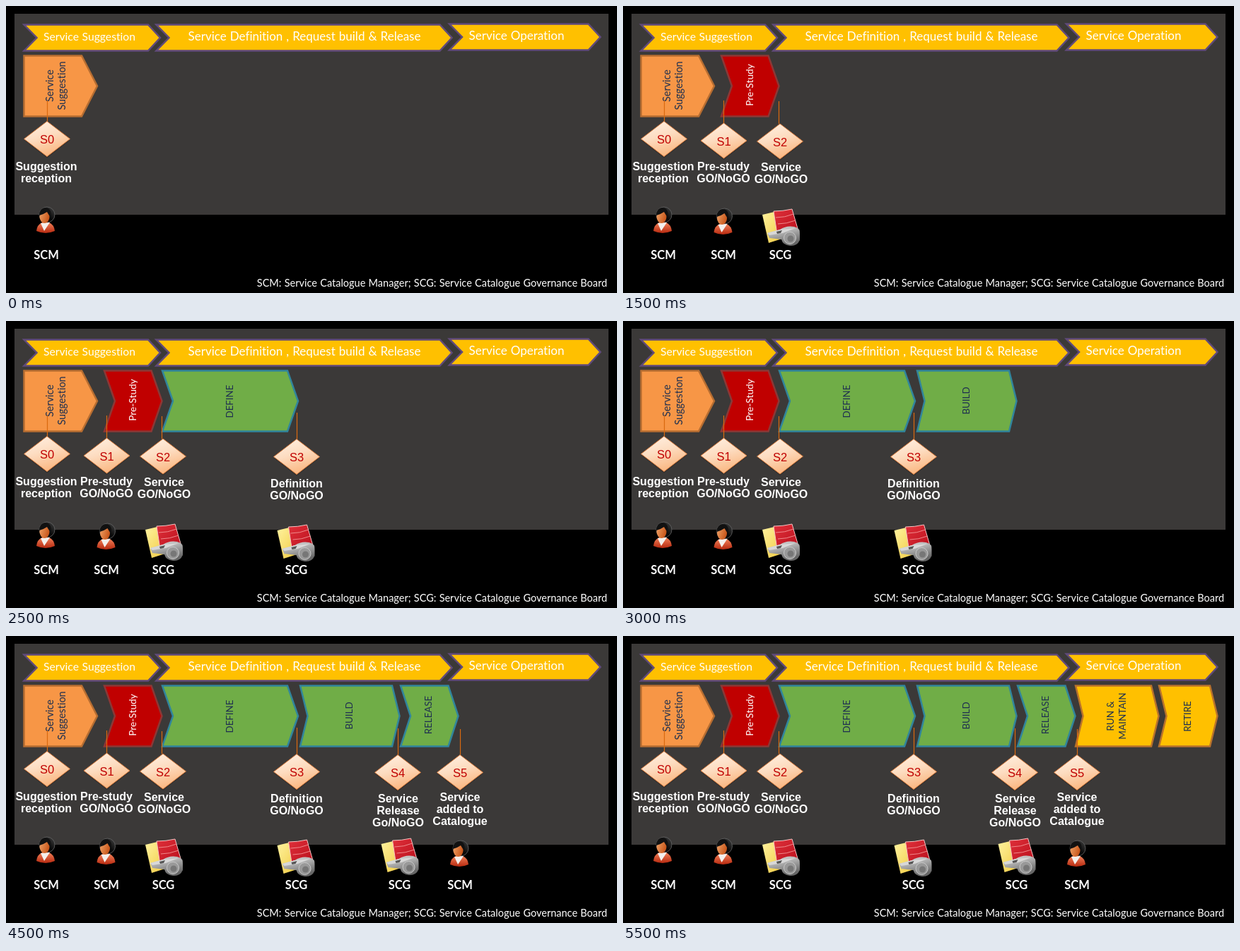
Write an HTML page that moves like this. It is 864 px wide and 407 px high and loops after 7000 ms.

```html
<!DOCTYPE html>
<html lang="en">
<head>
<meta charset="utf-8">
<title>Service life cycle</title>
<style>
html, body { margin: 0; width: 100%; height: 100%; overflow: hidden; background: #000; }
svg { display: block; width: 864px; height: 407px; }
text { font-family: Lato, Carlito, sans-serif; font-variant-ligatures: none; word-spacing: .04em; text-anchor: middle; fill: #fff; }
.label, .code { font: bold 16px "Liberation Sans", Arial, sans-serif; word-spacing: 0; }
.code { font-weight: normal; font-size: 16.5px; fill: #c00000; }
.role { font-size: 16.5px; font-weight: bold; }
</style>
</head>
<body>
<svg id="stage" viewBox="0 0 864 407">
  <defs>
    <linearGradient id="peach" x1=".2" y1="0" x2=".6" y2="1">
      <stop offset="0" stop-color="#fff0e2"/><stop offset=".45" stop-color="#fddcc0"/><stop offset="1" stop-color="#fab47c"/>
    </linearGradient>
    <linearGradient id="skin" x2="1" y2=".4">
      <stop offset="0" stop-color="#f0a468"/><stop offset="1" stop-color="#c9581c"/>
    </linearGradient>
    <linearGradient id="coat" x2="0" y2="1">
      <stop offset="0" stop-color="#f08058"/><stop offset="1" stop-color="#b82a10"/>
    </linearGradient>
    <linearGradient id="hair" x1="0" y1="1" x2="1" y2="0">
      <stop offset=".5" stop-color="#0a0a0a"/><stop offset="1" stop-color="#444"/>
    </linearGradient>
    <linearGradient id="yellow" x2="1" y2="1">
      <stop offset="0" stop-color="#fff3a0"/><stop offset="1" stop-color="#f0c83c"/>
    </linearGradient>
    <linearGradient id="red" x2="1" y2="1">
      <stop offset="0" stop-color="#e0303a"/><stop offset="1" stop-color="#b80f1c"/>
    </linearGradient>
    <linearGradient id="silver" x2=".4" y2="1">
      <stop offset="0" stop-color="#e4e4e4"/><stop offset=".5" stop-color="#a8a8a8"/><stop offset="1" stop-color="#666"/>
    </linearGradient>
    <g id="SCM">
      <circle cx="15" cy="12" r="11" fill="url(#hair)" stroke="#666" stroke-width=".8"/>
      <path d="M0 35Q1 26 8 23H18Q25 26 26 35Q13 41 0 35Z" fill="url(#coat)"/>
      <path d="M6 24L11 35L19 23Z" fill="#f4f0ec"/>
      <ellipse cx="11.5" cy="15" rx="7" ry="9" fill="url(#skin)"/>
      <path d="M4 13Q4 3 13 2Q22 3 20 15Q17 12 15 8Q11 11 4 13Z" fill="#111"/>
    </g>
    <g id="SCG">
      <path d="M1 9L22 4L32 42L10 49Z" fill="url(#yellow)"/>
      <path d="M17 4Q30 4 43 1L52 32Q36 38 22 37Z" fill="url(#red)" stroke="#f6c4c4"/>
      <path d="M20 13Q33 13 45 8M23 22Q35 22 48 17" fill="none" stroke="#f08a8c"/>
      <path d="M8 35L26 30Q35 24 46 26Q55 28 54 36L54 45Q50 54 40 53Q30 52 28 44L11 42Z" fill="url(#silver)"/>
      <path d="M8 35L26 30L48 28L30 35L11 38Z" fill="#d8d8d8"/>
      <circle cx="40" cy="42" r="8.5" fill="#999" stroke="#c8c8c8"/>
      <circle cx="41" cy="43" r="4.5" fill="#777"/>
      <path d="M21 33L29 31L27 35L22 36Z" fill="#555"/>
    </g>
  </defs>
  <rect width="864" height="407"/>
  <rect x="12" y="11" width="840" height="285" fill="#3b3938"/>
</svg>
<script>
const stage = document.getElementById("stage");
const NAVY = "#1f3050", GREEN = "#70ad47", TEAL = "#31859c", GOLD = "#ffc000", BROWN = "#b8722c";
const STEP = 500, LOOP = 7000;
const timed = [];

function add(markup, step) {
  const g = document.createElementNS("http://www.w3.org/2000/svg", "g");
  g.innerHTML = markup;
  stage.append(g);
  if (step !== undefined) timed.push([g, step * STEP]);
}

// Arrow from x to tip; head is the point's length, notch the depth of its tail.
function arrow(x, tip, top, bottom, head, notch, fill, stroke) {
  const mid = (top + bottom) / 2, neck = tip - head;
  return `<path d="M${x} ${top}H${neck}L${tip} ${mid}L${neck} ${bottom}H${x}L${x + notch} ${mid}Z"
    fill="${fill}" stroke="${stroke}" stroke-width="2.5"/>`;
}

function phase(step, x, tip, head, notch, fill, stroke, lines, base, y, size, ink = NAVY) {
  const words = lines.map((s, i) =>
    `<text transform="translate(${base + i * 17} ${y}) rotate(-90)" style="font-size:${size}px;fill:${ink}">${s}</text>`);
  add(arrow(x, tip, 70.5, 156.5, head, notch, fill, stroke) + words.join(""), step);
}

function milestone(step, n, x, y, lineX, lineTop, labelX, labelY, lines, role, iconX, iconY, roleX) {
  const label = lines.map((s, i) => `<text class="label" x="${labelX}" y="${labelY + i * 17}">${s}</text>`);
  add(`<path d="M${lineX} ${lineTop}V${y - 25}" stroke="#d9690f" stroke-width="1.2"/>
    <path d="M${x - 32} ${y + 2}L${x} ${y + 27}L${x + 32} ${y + 2}Z" fill="#222" opacity=".5"/>
    <path d="M${x - 32.5} ${y}L${x} ${y - 25}L${x + 32.5} ${y}L${x} ${y + 25}Z" fill="url(#peach)" stroke="#d5783a"/>
    <text class="code" x="${x}" y="${y + 6.5}">S${n}</text>${label.join("")}
    <use href="#${role}" x="${iconX}" y="${iconY}"/>
    <text class="role" x="${roleX}" y="359">${role}</text>`, step);
}

function banner(x, tip, top, s, textX, base, size) {
  add(arrow(x, tip, top, top + 37, 17, 18, GOLD, "#604a7b") +
    `<text x="${textX}" y="${base}" font-size="${size}">${s}</text>`);
}

banner(25.5, 218, 26.5, "Service Suggestion", 118, 49, 15.7);
banner(212.5, 630.5, 26.5, "Service Definition , Request build &amp; Release", 422, 49, 17);
banner(627, 840.5, 25.5, "Service Operation", 722, 48, 17);
add(`<text x="602.5" y="398" font-size="14.5">SCM: Service Catalogue Manager; SCG: Service Catalogue Governance Board</text>`);

phase(0, 25.5, 129, 22, 0, "#f79646", "#b66d31", ["Service", "Suggestion"], 67, 113, 14.4);
phase(2, 139, 220.5, 15, 15, "#c00000", "#8c3836", ["Pre-Study"], 184, 112, 13.7, "#fff");
phase(4, 221, 413, 15, 15, GREEN, TEAL, ["DEFINE"], 321, 114, 13.3);
phase(6, 416, 556.5, 10.5, 10.5, GREEN, TEAL, ["BUILD"], 490, 113, 13.3);
phase(8, 558, 639.5, 14, 14, GREEN, TEAL, ["RELEASE"], 602, 112, 13.3);
phase(10, 640, 757.5, 10.5, 10.5, GOLD, BROWN, ["RUN &amp;", "MAINTAIN"], 694, 113.5, 13.6);
phase(11, 758, 840.5, 10.5, 10.5, GOLD, BROWN, ["RETIRE"], 803, 114, 13.3);

const GO = "GO/NoGO";
milestone(0, 0, 58, 188.5, 58.5, 134, 57, 233, ["Suggestion", "reception"], "SCM", 43, 284, 57);
milestone(1, 1, 142.5, 191, 142.5, 134, 142, 233, ["Pre-study", GO], "SCM", 128.5, 286, 142);
milestone(3, 2, 222, 192, 220.5, 135, 223.5, 234, ["Service", GO], "SCG", 196, 287, 222.5);
milestone(5, 3, 411, 192.5, 411.5, 130, 411, 236, ["Definition", GO], "SCG", 382.5, 288, 410.5);
milestone(7, 4, 554, 193.5, 554.5, 131, 554.5, 236, ["Service", "Release", "Go/NoGO"], "SCG", 529.5, 286, 556.5);
milestone(9, 5, 642, 193.5, 642.5, 132, 642, 234, ["Service", "added to", "Catalogue"], "SCM", 628, 289, 642);

const start = performance.now();
function draw() {
  const t = (performance.now() - start) % LOOP;
  for (const [g, at] of timed) g.style.visibility = t >= at ? "visible" : "hidden";
  requestAnimationFrame(draw);
}
draw();
</script>
</body>
</html>
```
